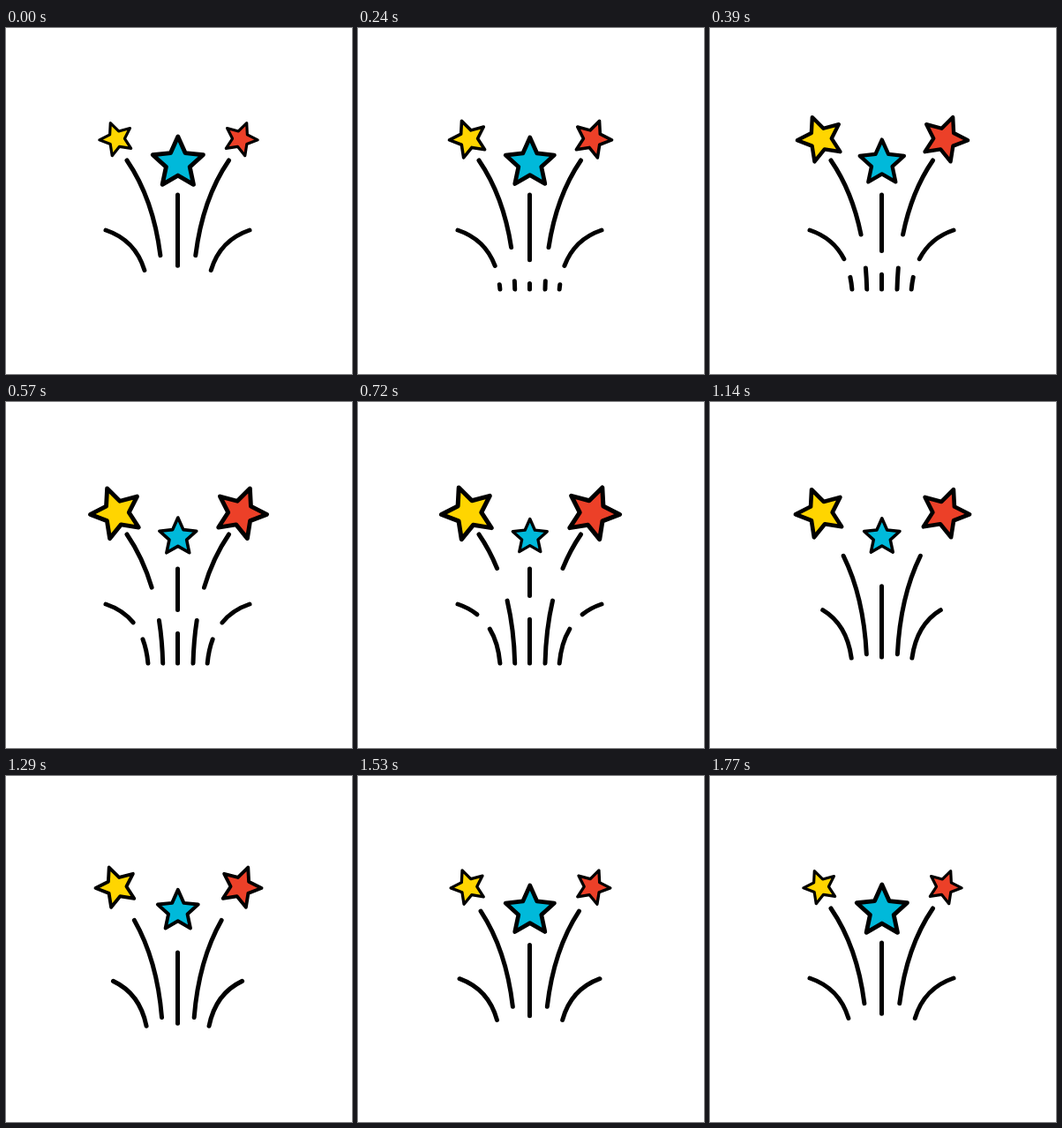
Animation, 392 px wide and 392 px high, one loop 1800 ms. Source, as an HTML page:

```html
<!DOCTYPE html>
<html lang="en">
<head>
<meta charset="utf-8">
<title>Fireworks</title>
<style>
  html, body { margin: 0; width: 100%; height: 100%; overflow: hidden; background: #fff; }
  svg { display: block; width: 100vw; height: 100vh; }
  path { fill: none; stroke: #000; stroke-width: 5; stroke-linecap: round; }
  polygon { stroke: #000; stroke-width: 4.9; stroke-linejoin: round; }
</style>
</head>
<body>
<svg id="stage" viewBox="0 0 392 392"></svg>
<script>
const LOOP = 1800, STEP = 30, TRAVEL = 1770, GAP = 0.25, RADIUS = 30;
const stage = document.getElementById('stage');

function add(tag, attrs) {
  const el = document.createElementNS('http://www.w3.org/2000/svg', tag);
  for (const key in attrs) el.setAttribute(key, attrs[key]);
  return stage.appendChild(el);
}

// Easing curve with flat ends: control points (x1, 0) and (x2, 1).
function easing(x1, x2) {
  return x => {
    if (x <= 0) return 0;
    if (x >= 1) return 1;
    let lo = 0, hi = 1;
    for (let i = 0; i < 24; i++) {
      const s = (lo + hi) / 2, r = 1 - s;
      if (3 * s * r * r * x1 + 3 * s * s * r * x2 + s * s * s < x) lo = s; else hi = s;
    }
    return lo * lo * (3 - 2 * lo);
  };
}
const flow = easing(0.325, 0.48);
const swell = easing(0.45, 0.28);
const shrink = easing(0.6, 0.39);

// Trails run from the bottom up; each is drawn in two pieces around a moving gap.
const trails = [
  'M194.5 296V189',
  'M177.7 296Q175.4 206 137 150',
  'M212 296Q214.2 206 252.5 150',
  'M160.9 296Q156.2 243.5 113 229',
  'M228.2 296Q233 243.5 276 229'
].map(d => [0, 1].map(() => add('path', { d, pathLength: 1 })));

function starPoints() {
  return Array.from({ length: 10 }, (_, i) => {
    const r = i % 2 ? RADIUS * 0.47 : RADIUS, a = (i * 36 - 90) * Math.PI / 180;
    return (r * Math.cos(a)).toFixed(2) + ',' + (r * Math.sin(a)).toFixed(2);
  }).join(' ');
}

// Each star goes from one scale to the other by mid-loop, then back.
const stars = [
  { x: 125.3, y: 125.8, turn: -21, fill: '#ffd500', from: 0.65, to: 1.04, ease: swell },
  { x: 265.7, y: 125.8, turn: 21, fill: '#ec4028', from: 0.65, to: 1.04, ease: swell },
  { x: 194.8, y: 153, turn: 0, fill: '#00b9da', from: 1, to: 0.67, ease: shrink }
].map(s => ({ ...s, el: add('polygon', { points: starPoints(), fill: s.fill }) }));

function trim(el, from, to) {
  const len = to - from;
  el.style.display = len > 0.004 ? '' : 'none';
  el.setAttribute('stroke-dasharray', len + ' 2');
  el.setAttribute('stroke-dashoffset', -from);
}

function draw(time) {
  const x = Math.min(1, time / TRAVEL), p = flow(x);
  for (const [lower, upper] of trails) {
    trim(lower, Math.max(0, p + GAP - 1), p);
    trim(upper, Math.min(1, p + GAP), 1);
  }
  for (const s of stars) {
    const k = x < 0.5 ? s.ease(x * 2) : 1 - s.ease(x * 2 - 1);
    const size = s.from + (s.to - s.from) * k;
    s.el.setAttribute('transform', `translate(${s.x} ${s.y}) rotate(${s.turn}) scale(${size})`);
  }
}

const start = performance.now();
function tick() {
  const time = (performance.now() - start) % LOOP;
  draw(Math.floor(time / STEP) * STEP);
  requestAnimationFrame(tick);
}
draw(0);
requestAnimationFrame(tick);
</script>
</body>
</html>
```
